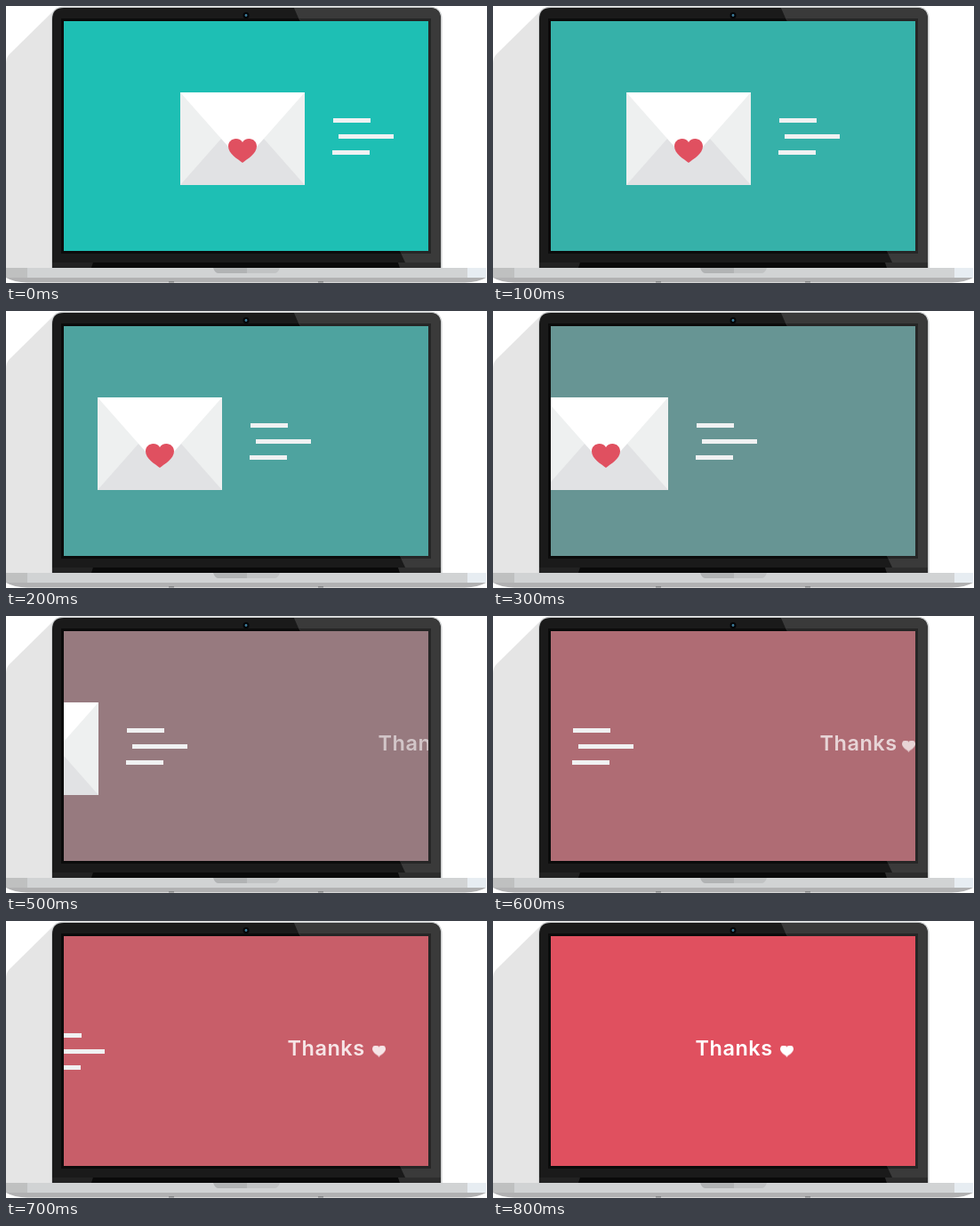
Animation, 541 px wide and 311 px high, one loop 900 ms. Source, as an HTML page:

```html
<!DOCTYPE html>
<html lang="en">
<head>
<meta charset="utf-8">
<title>Thanks</title>
<style>
html, body { margin: 0; width: 100%; height: 100%; overflow: hidden; background: #fff; }
svg { display: block; width: 541px; height: 311px; }

/* The tiny negative delay keeps each step on its 100 ms boundary. */
.wall, .mail, .word, .love { animation: 900ms step-end -1ms infinite; }
.wall { animation-name: wall; animation-timing-function: steps(9); }
.mail { animation-name: mail; }
.word { animation-name: word; }
.love { animation-name: love; }

@keyframes wall {
  from { fill: rgb(30, 191, 180); }
  to { fill: rgb(248, 66, 84); }
}
@keyframes mail {
  0% { transform: translateX(0); }
  11.11% { transform: translateX(-46px); }
  22.22% { transform: translateX(-93px); }
  33.33% { transform: translateX(-139px); }
  44.44% { transform: translateX(-186px); }
  55.55% { transform: translateX(-232px); }
  66.66% { transform: translateX(-278px); }
  77.77% { transform: translateX(-325px); }
  88.88%, to { transform: translateX(-372px); }
}
@keyframes word {
  0% { transform: translateX(260px); opacity: 0; }
  55.55% { transform: translateX(191px); opacity: .57; }
  66.66% { transform: translateX(140px); opacity: .71; }
  77.77% { transform: translateX(89px); opacity: .84; }
  88.88%, to { transform: none; opacity: 1; }
}
@keyframes love {
  0% { transform: translateX(260px); opacity: 0; }
  55.55% { transform: translateX(185px); opacity: .57; }
  66.66% { transform: translateX(137px); opacity: .71; }
  77.77% { transform: translateX(89px); opacity: .84; }
  88.88%, to { transform: none; opacity: 1; }
}
</style>
</head>
<body>
<svg viewBox="0 0 541 311">
  <defs>
    <clipPath id="screen"><rect x="65" y="17" width="410" height="258"/></clipPath>
    <clipPath id="lid"><path d="M52 294V15Q52 2 65 2H476Q489 2 489 15V294Z"/></clipPath>
    <path id="heart" d="M16 27C11 23 0 17 0 8.500C0 3.500 4 0 8.500 0C12 0 14.500 1.500 16 4C17.500 1.500 20 0 23.500 0C28 0 32 3.500 32 8.500C32 17 21 23 16 27Z"/>
  </defs>

  <path fill="#e5e5e5" d="M56 3L4 54Q0 58 0 65V294H56Z"/>

  <path fill="#c9cbcc" d="M51 294V15Q51 .5 65.500 .5H475.500Q490.500 .5 490.500 15V294Z"/>
  <g clip-path="url(#lid)">
    <path fill="#1a1a1a" d="M51 0H491V294H51Z"/>
    <path fill="#3a3a3a" d="M323 0H491V288H449L443 275Z"/>
    <path fill="#222" d="M51 288H98L96 294H51Z"/>
    <path fill="#0a0a0a" d="M98 288H441L443 294H96Z"/>
    <path fill="#2d2d2d" d="M441 288H491V294H443Z"/>
  </g>
  <path fill="#0b0b0b" d="M62 14H329L331 17H475V275H443L444.500 278H62Z"/>
  <path fill="#262626" d="M330 14H478V278H444.500L443 275H475V17H331Z"/>
  <circle cx="270" cy="10.500" r="3.500" fill="#050608"/>
  <circle cx="270" cy="10.500" r="1.400" fill="#3d7d9c"/>

  <g clip-path="url(#screen)">
    <rect class="wall" x="65" y="17" width="410" height="258"/>
    <g class="mail">
      <path fill="#eef0f0" d="M196 97H336V201H196Z"/>
      <path fill="#e1e2e4" d="M196 201L242 149H290L336 201Z"/>
      <path fill="#fff" d="M196 97H336L274 167Q266 175 258 167Z"/>
      <use href="#heart" x="250" y="149" fill="#e05060"/>
      <path fill="#f0f1f2" d="M368 126h42v5h-42zM374 144h62v5h-62zM367 162h42v5h-42z"/>
    </g>
    <text class="word" x="227.500" y="151" fill="#fff" font-family="Inter, sans-serif" font-size="23.500" font-weight="600" letter-spacing=".5">Thanks</text>
    <g class="love"><use href="#heart" transform="translate(323 139.500) scale(.47)" fill="#fff"/></g>
  </g>

  <path fill="#b1b1b2" d="M0 304H540V305Q531 310 516 310.500H24Q9 310 0 305Z"/>
  <path fill="#d1d3d4" d="M0 294H540V305H0Z"/>
  <path fill="#bfc0c0" d="M0 294H24V305H0Z"/>
  <path fill="#e7edf2" d="M519 294H540V305H519Z"/>
  <path fill="#b1b3b4" d="M233 294H271V300H239Q235 300 233 294Z"/>
  <path fill="#c1c3c4" d="M271 294H308Q306 300 302 300H271Z"/>
  <path fill="#858687" d="M183 309h6v1.500h-6zM351 309h6v1.500h-6z"/>
</svg>
</body>
</html>
```
